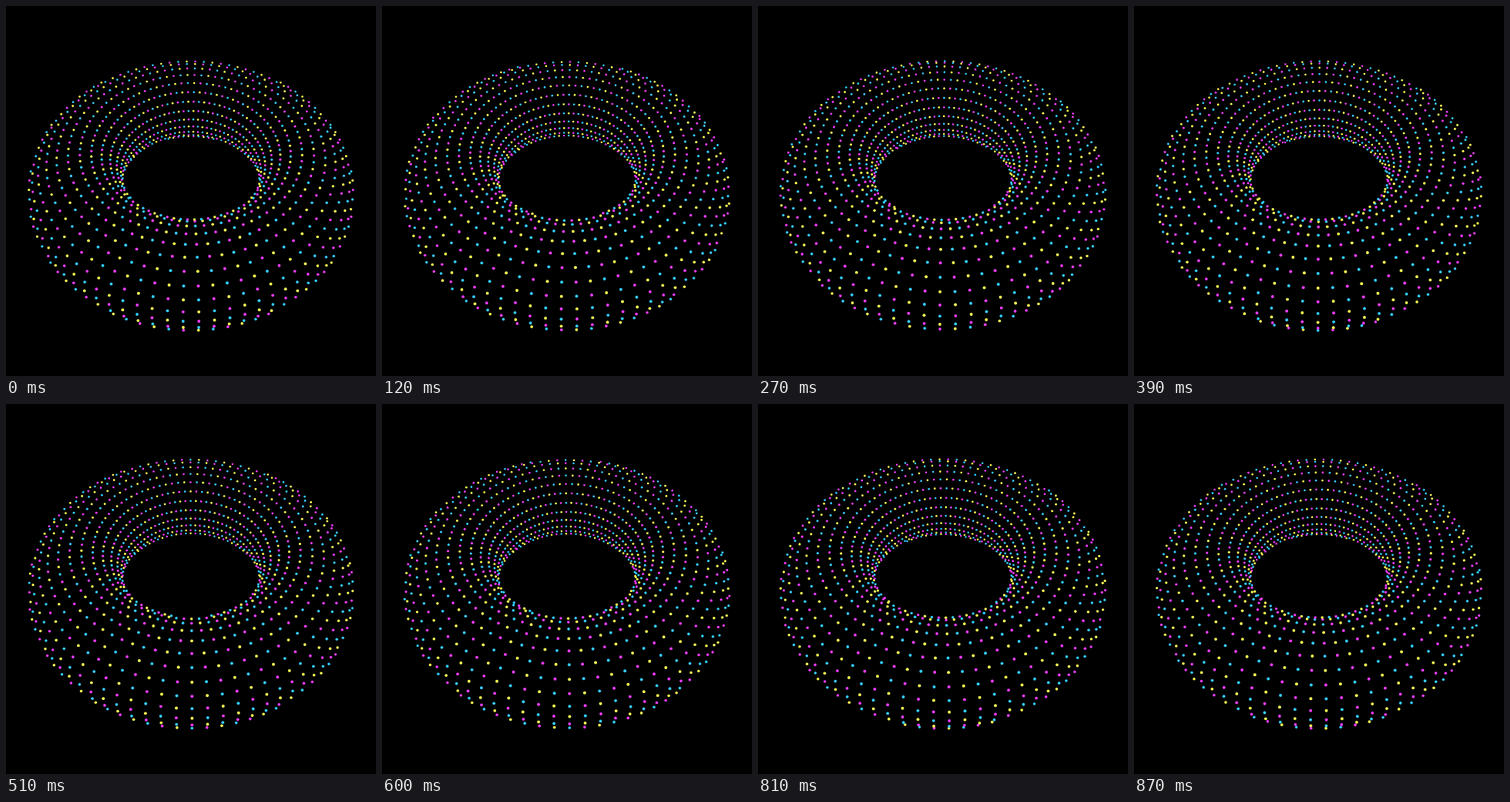
Recreate the animation shown at these times as an HTML page with a canvas. Size 480x480 px, loop 900 ms.

```html
<!DOCTYPE html>
<html>
<head>
<meta charset="utf-8">
<style>
  html, body { margin: 0; height: 100%; overflow: hidden; background: #000; }
  canvas { display: block; }
</style>
</head>
<body>
<canvas id="stage" width="480" height="480"></canvas>
<script>
const ctx = document.getElementById('stage').getContext('2d');
const { sin, cos, PI, floor } = Math;

const LOOP = 900, STEP = 30;
const RING = 145, TUBE = 56.5, CAMERA = 525;
const TILT = 48.8 * PI / 180;
const CENTER_X = 240, CENTER_Y = 213.3;
const COLUMNS = 84, ROWS = 27, FIRST_ROW = 37.9 * PI / 180;
const DOT = 1.42;
const COLORS = ['#ffff55', '#33ccff', '#f03cff'];

// Tilts a vector (right, up, forward) towards the viewer.
function tilt(x, h, d) {
  return [x, h * cos(TILT) - d * sin(TILT), h * sin(TILT) + d * cos(TILT)];
}

function drawDot(u, v, color) {
  const radius = RING + TUBE * cos(v);
  const [x, y, z] = tilt(radius * sin(u), TUBE * sin(v), radius * cos(u));
  const [nx, ny, nz] = tilt(cos(v) * sin(u), sin(v), cos(v) * cos(u));
  const depth = CAMERA - z;
  const facesViewer = nz * depth > nx * x + ny * y;
  if (!facesViewer) return;

  const scale = CAMERA / depth;
  ctx.fillStyle = color;
  ctx.beginPath();
  ctx.arc(CENTER_X + x * scale, CENTER_Y - y * scale, DOT * scale, 0, 2 * PI);
  ctx.fill();
}

// Each loop carries the dots one column round and two rows inwards.
function draw(progress) {
  ctx.fillStyle = '#000';
  ctx.fillRect(0, 0, 480, 480);
  for (let row = 0; row < ROWS; row++) {
    const v = FIRST_ROW + (row + 2 * progress) * 2 * PI / ROWS;
    for (let col = 0; col < COLUMNS; col++) {
      const u = (col - 0.5 + progress) * 2 * PI / COLUMNS;
      drawDot(u, v, COLORS[(row + col) % 3]);
    }
  }
}

function tick() {
  const time = performance.now() % LOOP;
  draw(floor(time / STEP) * STEP / LOOP);
  requestAnimationFrame(tick);
}
tick();
</script>
</body>
</html>
```
